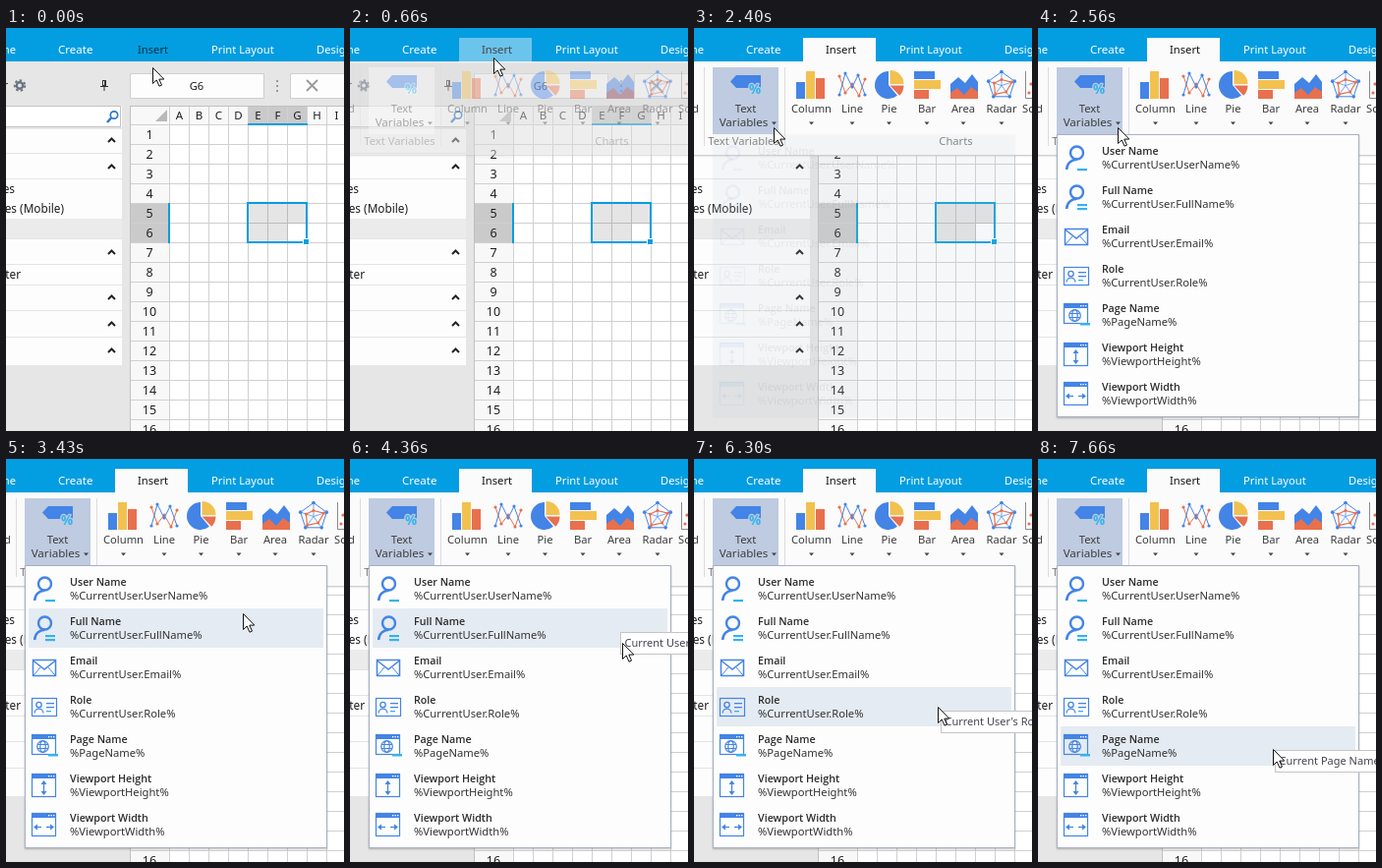
Animation of 344 by 410 pixels, one loop 8000 ms. Source, as an HTML page with a canvas:

```html
<!DOCTYPE html>
<html lang="en">
<head>
<meta charset="utf-8">
<title>Text Variables menu</title>
<style>
html, body { margin: 0; width: 100%; height: 100%; overflow: hidden; background: #e6e6e6; }
canvas { display: block; width: 344px; height: 410px; }
</style>
</head>
<body>
<canvas id="stage"></canvas>
<script>
const W = 344, H = 410, LOOP = 8000;
const BLUE = '#4384e6', CYAN = '#34b3ee', RED = '#e8704e', YELLOW = '#f2c14f', BAR = '#039de1';
const FONT = '"Noto Sans", "Open Sans", sans-serif';
const canvas = document.getElementById('stage');
const ctx = canvas.getContext('2d');
const dpr = window.devicePixelRatio || 1;
canvas.width = W * dpr;
canvas.height = H * dpr;

// drawing helpers
function box(x, y, w, h, color) {
  ctx.fillStyle = color;
  ctx.fillRect(x, y, w, h);
}

function frame(x, y, w, h, fill, edge) {
  box(x, y, w, h, edge);
  box(x + 1, y + 1, w - 2, h - 2, fill);
}

function label(str, x, y, opt = {}) {
  ctx.font = opt.font || `${opt.size || 11.2}px ${FONT}`;
  ctx.textAlign = opt.align || 'left';
  ctx.fillStyle = opt.color || '#1e1e1e';
  ctx.fillText(str, x, y);
}

function trace(pts, closed) {
  ctx.beginPath();
  for (let i = 0; i < pts.length; i += 2) ctx.lineTo(pts[i], pts[i + 1]);
  if (closed) ctx.closePath();
}

function line(pts, color, width = 1, closed = false) {
  trace(pts, closed);
  ctx.strokeStyle = color;
  ctx.lineWidth = width;
  ctx.stroke();
}

function poly(pts, color) {
  trace(pts, true);
  ctx.fillStyle = color;
  ctx.fill();
}

function ring(x, y, r, color, width, from = 0, to = Math.PI * 2) {
  ctx.beginPath();
  ctx.arc(x, y, r, from, to);
  ctx.strokeStyle = color;
  ctx.lineWidth = width;
  ctx.stroke();
}

function dots(pts, r, color) {
  for (let i = 0; i < pts.length; i += 2) {
    ctx.beginPath();
    ctx.arc(pts[i], pts[i + 1], r, 0, Math.PI * 2);
    ctx.fillStyle = color;
    ctx.fill();
  }
}

function faded(alpha, draw) {
  if (alpha <= 0) return;
  ctx.save();
  ctx.globalAlpha = alpha;
  draw();
  ctx.restore();
}

function shadowed(blur, draw) {
  ctx.save();
  ctx.shadowColor = 'rgba(0,0,0,0.25)';
  ctx.shadowBlur = blur * dpr;
  ctx.shadowOffsetY = dpr;
  draw();
  ctx.restore();
}

const ramp = (t, a, b) => Math.min(1, Math.max(0, (t - a) / (b - a)));
const smooth = p => p * p * (3 - 2 * p);

// time, x, y of the pointer
const PATH = [
  [0, 149, 40], [30, 149, 40], [260, 146, 30], [1530, 146, 30], [2060, 81, 101],
  [3200, 81, 101], [3510, 272, 168], [4060, 272, 168], [4360, 277, 187], [4620, 271, 208],
  [5800, 271, 208], [6180, 248, 252], [7200, 248, 252], [7540, 239, 295], [LOOP, 239, 295]
];

function pointer(t) {
  let i = 1;
  while (i < PATH.length - 1 && t > PATH[i][0]) i++;
  const a = PATH[i - 1], b = PATH[i];
  const p = smooth(ramp(t, a[0], b[0]));
  return [a[1] + (b[1] - a[1]) * p, a[2] + (b[2] - a[2]) * p].map(Math.round);
}

const ITEMS = [
  ['User Name', '%CurrentUser.UserName%'],
  ['Full Name', '%CurrentUser.FullName%'],
  ['Email', '%CurrentUser.Email%'],
  ['Role', '%CurrentUser.Role%'],
  ['Page Name', '%PageName%'],
  ['Viewport Height', '%ViewportHeight%'],
  ['Viewport Width', '%ViewportWidth%']
];

// menu row, fade-in start, fade-in end, x, y, text
const TIPS = [
  [1, 3510, 3630, 275, 176, "Current User's Full Name"],
  [2, 4620, 4730, 273, 216, "Current User's Email"],
  [3, 6180, 6300, 251, 256, "Current User's Role"],
  [4, 7540, 7660, 241, 296, 'Current Page Name']
];

function topBar(t) {
  box(0, 0, W, 34, BAR);
  label('Home', 10, 26, { align: 'right', color: '#fff' });
  label('Create', 53, 26, { color: '#fff', size: 11.5 });
  label('Insert', 134, 26, { color: t < 120 ? '#12303f' : '#0b1c26' });
  label('Print Layout', 209, 26, { color: '#fff' });
  label('Design', 316, 26, { color: '#fff' });
}

function sidePanel() {
  label('Explorer', 2, 62, { align: 'right' });
  ctx.setLineDash([2.4, 2.31]);
  ring(14, 58.5, 5.2, '#6b7280', 2);
  ctx.setLineDash([]);
  ring(14, 58.5, 3.2, '#6b7280', 2.4);
  box(98, 53, 4, 6, '#333');
  box(99, 54, 1, 4, '#fff');
  box(96, 59, 8, 1, '#333');
  box(99.5, 60, 1, 4, '#333');

  box(0, 79, 118, 264, '#fdfdfd');
  frame(-2, 79, 119, 22, '#fff', '#c3c3c3');
  ring(110, 88.5, 3.7, '#2879c8', 1.7);
  line([107, 91.5, 103, 96], '#2879c8', 2.4);
  box(0, 101, 118, 2, '#e6e6e6');
  for (const y of [127, 153, 214, 240, 261, 287, 314]) box(0, y, 118, 1, '#e4e4e4');
  for (const y of [114, 141, 228, 274, 301, 328]) line([104, y + 2, 107.5, y - 1.5, 111, y + 2], '#222', 2);
  box(0, 194, 118, 20, '#ebebeb');
  label('Pages', 9, 168, { align: 'right', size: 11.8 });
  label('Pages (Mobile)', 59, 188, { align: 'right', size: 11.8 });
  label('Master', 15, 255, { align: 'right', size: 11.8 });
}

function sheet() {
  frame(126, 46, 137, 26, '#fdfdfd', '#cfcfcf');
  label('G6', 194, 63, { align: 'center' });
  for (const y of [53, 58, 63]) box(275, y, 2, 2, '#999');
  frame(289, 46, 70, 26, '#fdfdfd', '#cfcfcf');
  line([306, 53, 317, 64], '#9a9a9a', 2);
  line([317, 53, 306, 64], '#9a9a9a', 2);

  box(126, 79, 218, 331, '#fff');
  box(127, 79, 217, 19, '#f8f8f8');
  box(127, 98, 39, 312, '#f8f8f8');
  box(247, 79, 59, 18, '#cacaca');
  box(127, 179, 38, 39, '#cacaca');
  for (let i = 0; i < 9; i++) {
    const x = 166 + i * 20;
    box(x, 79, 1, 331, '#d0d0d0');
    label('ABCDEFGHI'[i], x + 10.5, 93, { align: 'center', size: 11.5 });
  }
  for (let n = 1; n <= 16; n++) {
    const y = 78 + n * 20;
    box(127, y, 217, 1, '#d0d0d0');
    label(n, 146, y + 15, { align: 'center', size: 12.5 });
  }
  box(126, 79, 1, 331, '#c0c0c0');
  box(126, 79, 218, 1, '#c0c0c0');
  poly([164, 83, 164, 95, 152, 95], '#b9b9b9');

  box(247, 179, 59, 39, 'rgba(0,0,0,0.1)');
  box(287, 199, 19, 19, '#fff');
  box(246, 97, 61, 2, BAR);
  box(165, 178, 2, 41, BAR);
  ctx.strokeStyle = BAR;
  ctx.lineWidth = 2;
  ctx.strokeRect(246, 178, 60, 40);
  box(302, 214, 7, 7, '#fff');
  box(303, 215, 5, 5, BAR);
}

function tagIcon(back) {
  poly([37, 54.5, 43, 48, 68, 48, 68, 61, 43, 61], BLUE);
  ctx.font = `600 13.5px ${FONT}`;
  ctx.textAlign = 'center';
  ctx.lineJoin = 'round';
  ctx.lineWidth = 2.5;
  ctx.strokeStyle = back;
  ctx.strokeText('%', 62, 67);
  label('%', 62, 67, { font: ctx.font, align: 'center', color: CYAN });
  ctx.lineJoin = 'miter';
}

function chartIcons() {
  box(104, 55, 9, 17, BLUE);
  box(114, 44, 9, 28, YELLOW);
  box(124, 51, 9, 21, RED);

  const up = [148, 68, 154, 46, 161, 60, 167, 48, 174, 68];
  const down = [148, 49, 154, 66, 161, 57, 168, 69, 174, 52];
  line(down, RED, 1);
  dots(down, 1.6, RED);
  line(up, BLUE, 1);
  dots(up, 1.6, BLUE);

  const wedge = (x, y, a, b, color) => {
    ctx.beginPath();
    ctx.moveTo(x, y);
    ctx.arc(x, y, 14, a * Math.PI, b * Math.PI);
    ctx.fillStyle = color;
    ctx.fill();
  };
  wedge(198, 58, 0.28, 1.5, BLUE);
  wedge(199.5, 57, -0.5, 0, YELLOW);
  wedge(199.5, 58.5, 0, 0.26, RED);

  box(224, 44, 21, 8, BLUE);
  box(224, 53, 27, 9, YELLOW);
  box(224, 63, 15, 9, RED);

  poly([261, 72, 261, 57, 269, 50, 276, 56, 283, 47, 289, 55, 289, 72], BLUE);
  poly([261, 72, 261, 66, 268, 61, 275, 68, 282, 60, 289, 65, 289, 72], RED);

  const star = radii => radii.flatMap((r, i) => {
    const a = (i * 0.4 - 0.5) * Math.PI;
    return [313 + r * Math.cos(a), 58.5 + r * Math.sin(a)];
  });
  const outer = star([14, 14, 14, 14, 14]);
  const inner = star([6, 11, 8, 11, 8]);
  line(outer, BLUE, 1, true);
  for (let i = 0; i < 10; i += 2) line([313, 58.5, outer[i], outer[i + 1]], BLUE, 0.7);
  dots(outer, 1.8, BLUE);
  line(inner, RED, 1.2, true);
  dots(inner, 1.5, RED);

  line([337.5, 44, 337.5, 71.5, 344, 71.5], '#8a8a8a');
  dots([341, 66, 343, 57], 1.6, RED);
}

function ribbon(t) {
  const ink = { color: '#3c3c3c', align: 'center' };
  const dim = { color: '#7c7c7c', align: 'center' };
  const back = t < 1900 ? '#fbfbfb' : t < 2400 ? '#dde4f0' : '#bfcbe0';
  const arrow = x => poly([x - 2.5, 95.5, x + 2.5, 95.5, x, 98.5], '#444');
  shadowed(2, () => box(0, 34, W, 95, '#fbfbfb'));
  box(0, 129, W, 1, '#cfcfcf');
  box(111, 10, 74, 25, '#fbfbfb');
  label('Insert', 134, 26, { color: '#111' });
  box(19, 40, 67, 68, back);
  box(10, 40, 1, 80, '#dcdcdc');
  box(92, 40, 1, 80, '#dcdcdc');
  label('Board', 5, 86, { color: '#3c3c3c', align: 'right' });
  tagIcon(back);
  label('Text', 52.5, 86, ink);
  label('Variables', 50.5, 100, { ...ink, size: 11.6 });
  arrow(81.5);
  label('Text Variables', 50.5, 119, dim);
  label('Charts', 266.5, 119, dim);
  chartIcons();
  ['Column', 'Line', 'Pie', 'Bar', 'Area', 'Radar'].forEach((name, i) => {
    const x = [119.5, 161, 198.5, 237, 274, 313][i];
    label(name, x, 86, ink);
    arrow(x);
  });
  label('Scatter', 334, 86, { color: '#3c3c3c' });
}

function personIcon(y, lines) {
  ring(39.5, y - 5, 6.5, BLUE, 2.4);
  ring(39.5, y + 12, 10.3, BLUE, 2.4, Math.PI, Math.PI * 1.5);
  for (let i = 0; i < lines; i++) box(40, y + 11 - i * 4, 10, 2.2, CYAN);
}

function windowIcon(y, h) {
  ctx.strokeStyle = BLUE;
  ctx.lineWidth = 1.2;
  ctx.strokeRect(26.5, y + 0.5, 24, h);
  box(26, y, 25, 5, BLUE);
  for (const x of [43, 45.5, 48]) box(x, y + 2, 1.3, 1.3, '#fff');
}

function menuIcons() {
  personIcon(132, 1);
  personIcon(172, 2);

  ctx.strokeStyle = BLUE;
  ctx.lineWidth = 1.5;
  ctx.strokeRect(27.5, 204.5, 23, 16);
  line([27.5, 205, 39, 214, 50.5, 205], BLUE, 1.4);
  line([28, 220, 35.5, 211.5], BLUE, 1);
  line([50, 220, 42.5, 211.5], BLUE, 1);

  ctx.lineWidth = 1.2;
  ctx.strokeRect(26.5, 243.5, 25, 18);
  ring(33.5, 250, 2.7, BLUE, 1.3);
  ring(33.5, 258.5, 4.4, BLUE, 1.3, Math.PI, Math.PI * 2);
  box(41, 248, 8, 1.3, BLUE);
  box(41, 252, 8, 1.3, BLUE);
  box(41, 256, 5, 1.3, CYAN);

  windowIcon(280, 20);
  ring(37.5, 292.5, 5.8, BLUE, 1.2);
  ctx.beginPath();
  ctx.ellipse(37.5, 292.5, 2.7, 5.8, 0, 0, Math.PI * 2);
  ctx.stroke();
  line([32, 290.5, 43, 290.5], BLUE);
  line([32, 294.5, 43, 294.5], BLUE);
  box(43, 300, 10, 2.5, CYAN);

  windowIcon(320, 23);
  line([38.5, 328, 38.5, 341], BLUE, 1.3);
  poly([35.5, 331, 38.5, 327, 41.5, 331], BLUE);
  poly([35.5, 338, 38.5, 342, 41.5, 338], BLUE);

  windowIcon(360, 23);
  line([29, 374.5, 36, 374.5], BLUE, 1.3);
  line([41, 374.5, 48, 374.5], BLUE, 1.3);
  poly([32, 371.5, 28, 374.5, 32, 377.5], BLUE);
  poly([45, 371.5, 49, 374.5, 45, 377.5], BLUE);
}

function menu(row) {
  shadowed(2, () => box(19, 108, 308, 288, '#a9b1c2'));
  box(20, 109, 306, 286, '#fdfdfd');
  if (row >= 0) box(23, 112 + row * 40, 300, 40, '#e5ebf2');
  menuIcons();
  ITEMS.forEach(([name, code], i) => {
    const y = 129 + i * 40;
    label(name, 65, y, { font: '600 10.7px "Open Sans", "Noto Sans", sans-serif', color: '#2c2c2c' });
    label(code, 65, y + 14, { color: '#333' });
  });
}

function tips(t, row) {
  for (const [r, from, to, x, y, str] of TIPS) {
    if (r !== row) continue;
    faded(ramp(t, from, to), () => {
      frame(x, y, 180, 23, '#fff', '#c4c4c4');
      label(str, x + 4.5, y + 15, { color: '#444450', size: 11 });
    });
  }
}

function arrowCursor(x, y) {
  const shape = [0, 0, 0, 16, 3.7, 12.5, 6.5, 18.7, 9, 17.6, 6.3, 11.6, 11.3, 11.6];
  const pts = shape.map((v, i) => v + 0.5 + (i % 2 ? y : x));
  poly(pts, '#fff');
  line(pts, '#111', 1, true);
}

function draw(t) {
  const [x, y] = pointer(t);
  const inMenu = t > 3200 && x > 23 && y >= 112;
  const row = inMenu ? Math.floor((y - 112) / 40) : -1;
  ctx.setTransform(dpr, 0, 0, dpr, 0, 0);
  box(0, 0, W, H, '#e6e6e6');
  sidePanel();
  sheet();
  topBar(t);
  faded(ramp(t, 590, 760), () => ribbon(t));
  faded(ramp(t, 2390, 2560), () => menu(row));
  tips(t, row);
  arrowCursor(x, y);
}

const start = performance.now();
function tick() {
  draw((performance.now() - start) % LOOP);
  requestAnimationFrame(tick);
}
tick();
</script>
</body>
</html>
```
